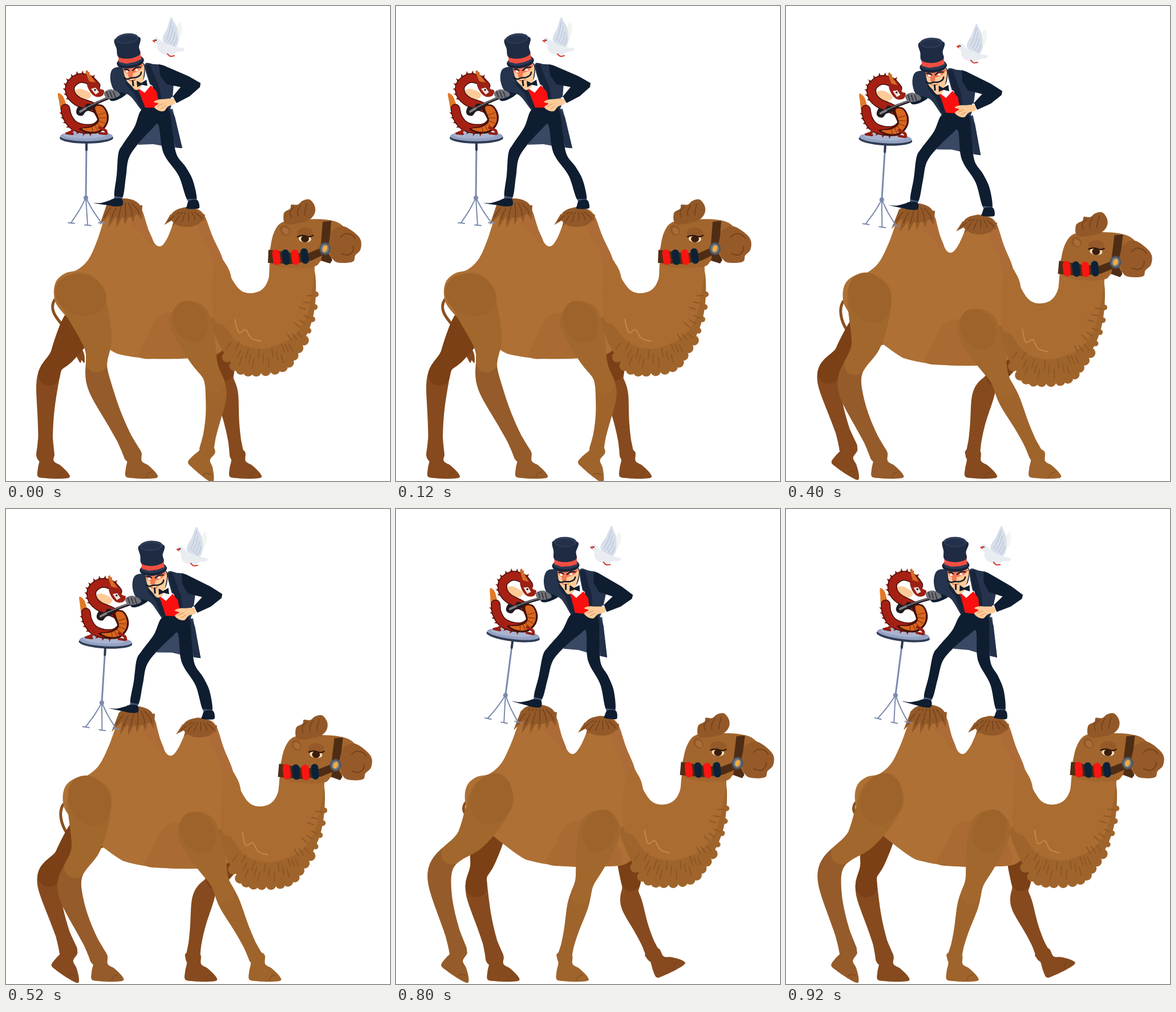
Recreate the animation shown at these times as an HTML page with a canvas. Size 673x832 px, loop 1000 ms.

```html
<!DOCTYPE html>
<html lang="en">
<head>
<meta charset="utf-8">
<title>Magician on a camel</title>
<style>
html, body { margin: 0; width: 100%; height: 100%; overflow: hidden; background: #fff; }
canvas { display: block; }
</style>
</head>
<body>
<canvas width="673" height="832"></canvas>
<script>
const g = document.querySelector('canvas').getContext('2d');
const RAD = Math.PI / 180, STEP = 200, POSES = 5, GROUND = 788;
const range = (n, f) => Array.from({ length: n }, (_, i) => f(i));

// ---------- geometry ----------
const pairs = s => {
  const n = s.split(' ').map(Number);
  return range(n.length / 2, i => [n[2 * i], n[2 * i + 1]]);
};

// Catmull-Rom point at u, one unit per key point
function spline(p, u, loop) {
  const n = p.length;
  const i = Math.min(Math.floor(u), loop ? n - 1 : n - 2), f = u - i;
  const at = k => loop ? p[(k + n) % n] : p[Math.max(0, Math.min(n - 1, k))];
  const [a, b, c, d] = [at(i - 1), at(i), at(i + 1), at(i + 2)];
  return [0, 1].map(k => 0.5 * (2 * b[k] + (c[k] - a[k]) * f +
    (2 * a[k] - 5 * b[k] + 4 * c[k] - d[k]) * f * f +
    (3 * b[k] - a[k] - 3 * c[k] + d[k]) * f ** 3));
}

function trace(p, soft, loop) {
  g.beginPath();
  const k = soft ? 8 : 1, last = (p.length - 1) * k + (soft && loop ? k - 1 : 0);
  for (let i = 0; i <= last; i++) g.lineTo(...(soft ? spline(p, i / k, loop) : p[i]));
  if (loop) g.closePath();
}
const paint = (color, p, soft) => { trace(p, soft, true); g.fillStyle = color; g.fill(); };
const poly = (color, s) => paint(color, pairs(s), false);
const blob = (color, s) => paint(color, pairs(s), true);
const stroke = (color, width, p) => {
  trace(p, true, false);
  g.strokeStyle = color;
  g.lineWidth = width;
  g.stroke();
};
const line = (color, width, s) => stroke(color, width, pairs(s));
const oval = (color, x, y, rx, ry = rx, deg = 0) => {
  g.fillStyle = color;
  g.beginPath();
  g.ellipse(x, y, rx, ry, deg * RAD, 0, 7);
  g.fill();
};
const mix = (a, b, f) => a.map((v, i) => v + (b[i] - v) * f);
const ray = ([x, y], len, deg) => [x + len * Math.sin(deg * RAD), y + len * Math.cos(deg * RAD)];
const ease = f => f * f * (3 - 2 * f);

// a pose is dx, dy, tilt about a pivot
const carry = ([dx, dy, deg], [px, py], [x, y]) => {
  const c = Math.cos(deg * RAD), s = Math.sin(deg * RAD);
  return [px + dx + (x - px) * c - (y - py) * s, py + dy + (x - px) * s + (y - py) * c];
};
const place = ([dx, dy, deg], [px, py], draw) => {
  g.save();
  g.translate(px + dx, py + dy);
  g.rotate(deg * RAD);
  g.translate(-px, -py);
  draw();
  g.restore();
};

// ---------- motion ----------
const BACK = [268, 421], STAND = [240, 350];
const sway = [[0, 0, 0], [32, 1, -2.2], [19, 11, 2.5], [26.5, 9, 0], [40, 8, 2.4]];
const balance = [[0, 0, 0], [34.5, 1, -0.6], [27, 8.5, 3], [31, 4.5, 3], [49.5, 2, 6.8]];
const tail = { swing: [26, 59, 32, 42, 56], flick: [21, 130, 100, -1, 93] };

// joint angles from straight down, forward is positive; a foot at 0 stands on the ground
const legs = {
  farHind: {
    hip: [128, 560], len: [109, 130], bulge: 0, cut: 1.9,
    size: { hip: 31, slim: 12.5, knee: 7, ankle: 4 }, colors: ['#7b4015', '#864a1e'],
    thigh: [-30, -31, -38, -9.5, -11], shin: [-2, -1, 16, 38, 15], foot: [0, 0, 32, 5, 0]
  },
  farFront: {
    hip: [378, 600], len: [80, 98], bulge: 0, cut: 1,
    size: { hip: 23, slim: 11, knee: 8, ankle: 2 }, colors: ['#7b4015', '#864a1e'],
    thigh: [7, -19, -33, -7, 2], shin: [9, 2, -10, -58, 23], foot: [0, 0, 0, 53, -28]
  },
  nearHind: {
    hip: [131, 506], len: [159, 141], bulge: 12, cut: 1.55,
    size: { hip: 39, slim: 13, knee: 8, ankle: 3 }, colors: ['#a2672c', '#955b2a'],
    patch: { rx: 46, ry: 36, turn: 40, spin: -1.9 },
    thigh: [11.6, 8.8, -12.7, -31.7, -35], shin: [25.4, 29, 23, 0, 13.5], foot: [0, 0, 0, 0, 32]
  },
  nearFront: {
    hip: [323, 553], len: [132, 103], bulge: 0, cut: 1.8,
    size: { hip: 36, slim: 11, knee: 7.5, ankle: 2 }, colors: ['#a2672c', '#9f642c'],
    patch: { rx: 29, ry: 38, turn: 0, spin: -1.3 },
    thigh: [20, 37, 24, 3.6, -16.5], shin: [-9.4, -9, 26, 5, -14.5], foot: [38, 38, 0, 0, 0]
  }
};

// ---------- camel ----------
const width = ({ hip, slim, knee, ankle }, u) =>
  slim + (hip - slim) * (1 - ease(Math.min(1, u / 2))) +
  knee * Math.exp(-(((u - 2) / 0.4) ** 2)) + ankle * Math.max(0, (u - 2.7) / 0.3);

function limb(color, nodes, size, from, to) {
  g.fillStyle = color;
  g.beginPath();
  for (let u = from; u <= to; u += 0.012) {
    const [x, y] = spline(nodes, u), r = width(size, u);
    g.moveTo(x + r, y);
    g.arc(x, y, r, 0, 7);
  }
  g.fill();
}

function drawLeg({ hip, len, bulge, cut, size, colors, patch, thigh, shin, foot }, k) {
  const top = carry(sway[k], BACK, hip), knee = ray(top, len[0], thigh[k]);
  const reach = foot[k] ? len[1] : (GROUND - knee[1]) / Math.cos(shin[k] * RAD);
  const ankle = ray(knee, reach, shin[k]), mid = mix(top, knee, 0.5);
  mid[0] += bulge;
  const nodes = [top, mid, knee, ankle];
  limb(colors[1], nodes, size, cut - 0.1, 2.97);
  place([...ankle, foot[k]], [0, 0], () => {
    blob(colors[1], '-13 -8 -10 6 -13 22 -13 36 0 39 24 40 42 38 40 30 27 17 15 9 14 -7 0 -14');
    line('#77401a', 1, '22 37 25 31 33 28');
  });
  limb(colors[0], nodes, size, 0, cut);
  if (patch) oval('#9e632b', ...top, patch.rx, patch.ry, patch.turn + patch.spin * thigh[k]);
}

function drawTail(k) {
  const root = carry(sway[k], BACK, [85, 515]);
  const end = ray(root, 86, tail.swing[k]), bend = ray(end, -30, tail.flick[k]);
  g.strokeStyle = '#8a5021';
  g.lineWidth = 5;
  g.beginPath();
  g.moveTo(...root);
  g.bezierCurveTo(root[0] - 16, root[1] + 26, ...bend, ...end);
  g.stroke();
  place([...end, 90 - tail.flick[k]], [0, 0], () =>
    blob('#84491d', '-6 -2 8 -6 22 -7 36 -2 30 1 33 5 16 7 4 4'));
}

const furEdge = pairs('541 465 543 505 538 545 525 580 508 605 493 627 470 637 440 640 415 638 394 624 370 585');

function fur() {
  paint('#9f642b', [...furEdge, [362, 545], [440, 560], [530, 455]], true);
  for (let u = 1; u <= 9.6; u += 0.55) oval('#9f642b', ...spline(furEdge, u), u < 3 ? 5 : 9);
}

function furLines() {
  for (let i = 3; i < 28; i++) {
    const p = spline(furEdge, i * 0.35), from = 0.05 + 0.06 * (i % 3);
    stroke('#8c5525', 1.8, [mix(p, [452, 510], from), mix(p, [452, 510], from + 0.12)]);
  }
}

// hair cap: a dome with strands fanning out below it
function tuft(cx, top, w, h, n) {
  oval('#935929', cx, top + 17, w * 0.86, 17);
  for (let i = 0; i < n; i++) {
    const a = i / (n - 1) * 2 - 1, x = cx + a * w * 0.6, y = top + 12;
    const tip = [cx + a * w * 1.05 - 5, top + h * (1 - 0.22 * Math.abs(a + 0.4))];
    paint('#935929', [[x - 9, y], [x + 12, y], mix([x + 12, y], tip, 0.75), tip], false);
    stroke('#744018', 1.5, [[cx + a * w * 0.4, top + 8], mix([x, y], tip, 0.3), mix([x, y], tip, 0.6)]);
  }
}

function torso() {
  blob('#ae7034', '84 505 88 482 104 468 125 462 145 443 160 410 171 376 181 347 207 339 234 350 254 404 268 421 282 408 304 358 326 354 346 364 362 404 378 440 395 476 400 560 376 606 330 616 260 618 208 612 182 602 126 562 92 528');
  blob('#a96b31', '233 614 246 582 262 548 286 537 312 546 350 570 364 606 330 616 270 618');
  blob('#ad6c37', '237 358 247 386 258 412 252 416 238 398 218 380');
  blob('#ad6c37', '346 368 362 404 380 446 364 456 357 430 336 390');
  tuft(206, 337, 35, 54, 6);
  tuft(317, 353, 33, 35, 6);
}

function neck() {
  fur();
  blob('#aa6c31', '363 464 379 444 394 475 410 497 428 503 448 497 460 478 466 440 500 440 538 448 536 500 526 545 508 574 480 592 446 600 408 590 382 560 364 545');
  furLines();
  line('#c08a4a', 2, '401 549 408 572 420 567 430 582 447 587');
}

function head() {
  blob('#a2652d', '463 450 464 420 470 396 482 380 506 375 560 374 590 385 606 418 592 440 556 444 541 456 500 459');
  blob('#925828', '490 382 487 363 498 355 500 348 511 348 520 341 532 339 541 350 541 363 532 374 515 380');
  range(3, i => line('#75431a', 1.7, `${500 + 12 * i} ${370 - 2 * i} ${498 + 13 * i} 360 ${505 + 11 * i} ${352 - 3 * i}`));
  oval('#925828', 489, 393, 10, 8, 50);
  oval('#a86d38', 490, 394, 7, 5, 50);
  blob('#965a29', '566 402 576 390 592 386 612 398 622 411 621 427 612 437 609 447 594 450 576 447 568 430');
  line('#713d18', 1.6, '586 405 595 399 606 401 612 407');
  line('#713d18', 1.6, '588 434 600 436 608 429 609 421');
  oval('#965a29', 524, 397, 14, 9);
  oval('#f7e2c4', 524, 408, 11, 6, 4);
  oval('#3c1e0c', 524, 408, 7, 6);
  line('#32190b', 2.4, '511 404 520 402 531 404 538 402');
  poly('#4f2d14', '555 378 570 376 568 402 563 430 572 445 568 451 552 446 556 427 552 416');
  poly('#4f2d14', '460 427 500 432 530 433 553 423 558 435 535 446 500 452 459 450');
  range(4, i => stroke(i % 2 ? '#0d2237' : '#fb1512', 13,
    [[473 + 16.5 * i, i === 3 ? 431 : 433], [475 + 16.5 * i, i === 3 ? 445 : 447]]));
  oval('#4d5661', 559, 425, 10, 11);
  oval('#777d82', 559, 425, 7, 8);
  oval('#f4ad42', 559, 425, 4, 6, 20);
}

// ---------- act on the humps ----------
function table() {
  line('#7b8aad', 3, '141 240 140 337');
  [-26, 3, 27].forEach(x => {
    const y = 384 - Math.abs(x) / 6;
    stroke('#7b8aad', 2, [[140, 336], [140 + x * 0.45, 358], [140 + x, y]]);
    stroke('#7b8aad', 2, [[135 + x, y], [146 + x, y + 1]]);
  });
  oval('#7b8aad', 140, 336, 4);
  line('#2c3a53', 4, '141 239 141 252');
  oval('#303c55', 141, 231, 47, 10);
  oval('#93a1c3', 141, 228, 46, 9);
  oval('#a9b4d0', 138, 226, 37, 6);
}

function dove() {
  blob('#f2f5f0', '287 63 300 36 305 28 309 42 303 60 293 76');
  blob('#d8dfea', '276 63 276 52 282 40 289 20 294 27 299 36 302 52 301 66 292 78');
  range(4, i => line('#b3c0d6', 1.1, `${281 + 4 * i} ${60 + 3 * i} ${286 + 4 * i} ${46 + 5 * i} ${290 + 3 * i} ${27 + 9 * i}`));
  blob('#e9edf1', '257 61 263 55 270 59 276 64 290 69 299 72 312 74 310 79 299 81 290 86 274 84 266 76 265 68');
  poly('#d83b2f', '262 58 256 61 261 64');
  oval('#30313c', 263, 60, 1.3);
  line('#d2332b', 2, '283 84 288 88 295 87');
}

function coat() {
  poly('#3a4864', '243 178 270 184 292 180 309 249 286 247 258 242 231 243 240 222');
  poly('#223049', '270 180 286 176 296 194 309 249 298 248 288 218');
  blob('#0f1d30', '207 146 193 150 181 158 184 166 196 164 211 154');
  blob('#25334c', '183 130 185 113 195 107 207 109 216 127 231 145 245 177 240 185 219 159 205 152 190 148');
  blob('#25334c', '243 105 260 102 278 106 292 124 293 147 287 181 267 181 261 162');
  poly('#17243a', '207 111 216 131 238 158 245 181 236 178 224 152 211 139');
  poly('#17243a', '244 104 252 102 269 143 274 170 267 176 257 148');
}

function man() {
  coat();
  blob('#0f1d30', '238 181 225 212 205 242 197 258 194 296 190 334 204 336 210 300 215 267 231 242 256 215 267 208 273 247 281 267 303 298 318 340 334 341 328 307 315 282 299 260 292 223 285 181 264 176');
  poly('#485878', '190 333 204 335 203 341 189 339');
  poly('#485878', '318 338 334 338 334 344 319 344');
  blob('#0f1d30', '153 345 166 345 180 341 190 337 203 338 204 349 192 351 178 349');
  blob('#0f1d30', '321 341 335 340 339 350 336 355 317 355 317 350');
  poly('#fff', '230 138 243 133 256 139 264 158 244 158 233 148');
  poly('#fc100f', '230 143 243 152 254 139 264 150 270 178 244 178 237 160');
  poly('#0f1d30', '268 102 276 104 320 123 341 135 340 142 322 158 299 170 291 160 306 142 281 137 270 121');
  poly('#fff', '289 160 293 159 299 171 294 173');
  blob('#fecb98', '293 162 296 171 284 176 277 184 267 183 260 177 267 171 259 168 267 164 278 163');
  range(2, i => line('#d88c5d', 1, `${266 + 5 * i} ${176 + 4 * i} ${275 + 4 * i} ${171 + 4 * i}`));
  face();
  hat();
}

function face() {
  blob('#192437', '236 101 243 103 243 122 238 132 232 124');
  blob('#fecb98', '208 103 206 114 211 130 219 139 227 147 236 143 240 131 240 101');
  blob('#f17855', '207 104 207 114 214 119 222 118 234 112 239 102');
  range(2, i => oval('#fff', 212 + 17 * i, 115 - 3 * i, 2.6, 1.8));
  line('#161a25', 2.2, '207 111 212 111 217 114');
  line('#161a25', 2.2, '222 113 228 108 236 107');
  blob('#f17855', '217 112 221 113 222 123 216 125 214 121');
  line('#161a25', 2.6, '207 126 213 128 219 126 228 125 235 121 237 116');
  line('#c53e31', 1.2, '216 130 221 131 227 129');
  line('#161a25', 3, '222 131 223 139');
  poly('#121d2d', '229 131 237 135 246 129 248 140 238 138 230 142');
}

function hat() {
  oval('#17243a', 218, 98, 24, 11, -9);
  oval('#2b3a54', 218, 95, 22, 9, -9);
  poly('#f14f42', '196 84 235 78 237 93 226 98 211 101 198 98');
  blob('#1e2b42', '192 57 194 76 196 88 206 92 222 91 235 84 233 72 233 54');
  oval('#2e3c56', 212, 57, 20, 9, -6);
  oval('#22304a', 212, 58, 17, 6, -6);
}

const coil = pairs('157 140 145 129 127 127 113 139 114 155 126 167 147 175 165 184 170 199 157 213 137 215 119 209 108 195 104 180');

function spikes(from, to, center) {
  for (let u = from; u <= to; u += 0.4) {
    const p = spline(coil, u), d = Math.hypot(p[0] - center[0], p[1] - center[1]);
    const nx = (p[0] - center[0]) / d, ny = (p[1] - center[1]) / d;
    const at = (out, side) => [p[0] + nx * out - ny * side, p[1] + ny * out + nx * side];
    paint('#8f1c10', [at(4, -4), at(13, 3), at(4, 4)], false);
  }
}

function dragon() {
  blob('#fecb98', '119 151 130 145 148 153 145 162 128 164');
  blob('#e07927', '104 190 96 181 93 167 91 153 99 157 104 168 108 182');
  spikes(0.8, 4.6, [139, 151]);
  spikes(9.5, 12.6, [141, 192]);
  stroke('#421009', 17, coil);
  stroke('#a72014', 14, coil);
  blob('#421009', '150 177 168 173 179 188 178 206 165 221 145 223 128 215 148 210 160 200');
  blob('#d7661f', '156 178 168 176 176 189 175 205 163 218 146 220 133 215 150 212 163 201');
  range(6, i => stroke('#7d2c10', 1, [ray([148, 196], 15, 10 + 20 * i), ray([148, 196], 27, 10 + 20 * i)]));
  blob('#9d2015', '142 137 149 130 160 135 165 145 172 148 169 157 158 159 148 151');
  poly('#d46c27', '146 132 139 115 142 112 151 126 157 134');
  poly('#eee6df', '149 145 157 143 163 151 157 155');
  oval('#171316', 156, 147, 1.7);
  line('#9b2116', 5, '120 213 115 220 110 222');
  line('#9b2116', 5, '164 213 174 218 176 223');
  blob('#201b20', '123 185 127 176 136 178 142 171 151 174 149 182 140 185 134 192 126 191');
  line('#817e82', 4, '130 185 140 179');
  line('#211b22', 5, '143 178 163 168 187 158');
  line('#777379', 2, '141 178 163 167 187 157');
  blob('#707178', '172 152 183 146 197 151 199 157 187 162 176 161');
  range(3, i => line('#23212a', 1.3, `${176 + 6 * i} 150 ${180 + 6 * i} 160`));
  range(2, i => line('#911d13', 4, `${106 + 58 * i} 223 ${117 + 58 * i} 224`));
}

// ---------- scene ----------
function draw(k) {
  g.clearRect(0, 0, 673, 832);
  g.lineCap = g.lineJoin = 'round';
  drawTail(k);
  drawLeg(legs.farHind, k);
  drawLeg(legs.farFront, k);
  place(sway[k], BACK, () => { torso(); neck(); head(); });
  drawLeg(legs.nearHind, k);
  drawLeg(legs.nearFront, k);
  place(balance[k], STAND, () => { dove(); man(); table(); dragon(); });
}

let shown = -1;
function tick() {
  const k = Math.floor(performance.now() / STEP) % POSES;
  if (k !== shown) draw(shown = k);
  requestAnimationFrame(tick);
}
tick();
</script>
</body>
</html>
```
